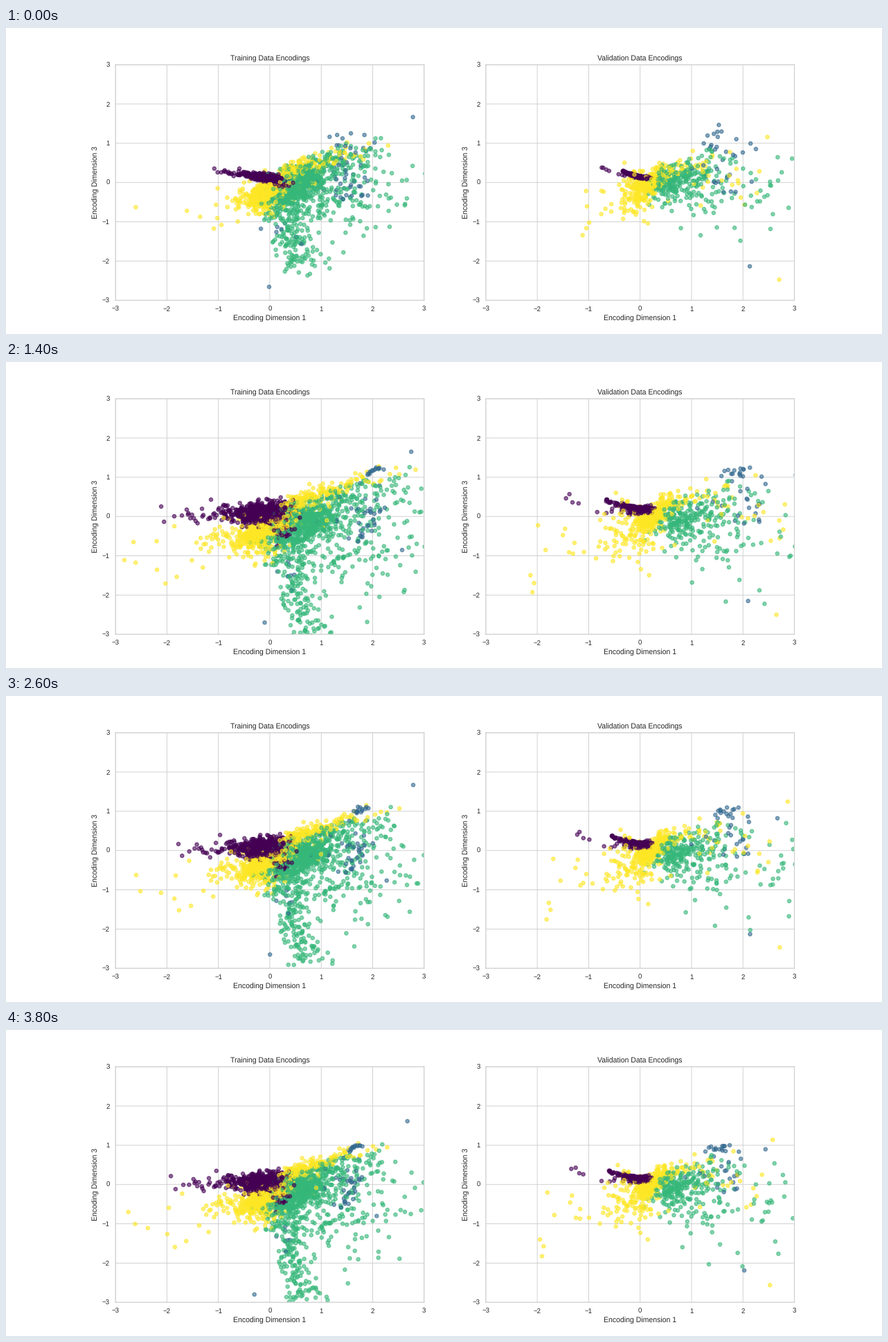
Animation, 1265 px wide and 443 px high, one loop 4000 ms. Source, as a matplotlib script:

```python
import numpy as np
import matplotlib.pyplot as plt
from matplotlib.animation import FuncAnimation

W, H, DPI = 1265, 443, 64
K = 63.25 / DPI  # point size correction
FRAMES = 20
PURPLE, BLUE, GREEN, YELLOW = range(4)
COLORS = np.array(["#440154", "#31688e", "#35b779", "#fde725"])

plt.rcParams.update({
    "font.family": "Liberation Sans", "text.hinting": "no_hinting",
    "text.color": ".15", "axes.labelcolor": ".15",
    "xtick.color": ".15", "ytick.color": ".15",
    "axes.edgecolor": ".8", "axes.linewidth": 1.25 * K,
    "axes.axisbelow": True, "axes.grid": True,
    "grid.color": ".8", "grid.linewidth": K, "path.snap": False,
    "axes.titlesize": 12 * K, "axes.labelsize": 12 * K,
    "axes.titlepad": 6 * K, "axes.labelpad": 4 * K,
    "xtick.labelsize": 11 * K, "ytick.labelsize": 11 * K,
    "xtick.bottom": False, "ytick.left": False,
    "xtick.major.size": 6 * K, "ytick.major.size": 6 * K,
    "xtick.major.pad": 3.5 * K, "ytick.major.pad": 3.5 * K,
})


def stretch(i, start, peak, rest, drift):
    """Grow fast to a peak, ease back around epoch 8, then drift."""
    value = start + (peak - start) * (1 - np.exp(-i / 1.2))
    u = np.clip((i - 6) / 3, 0, 1)
    return value + (rest - value) * u * u * (3 - 2 * u) + drift * max(i - 9, 0)


def blob(rng, n, cx, cy, sx, sy, slope=0):
    x = rng.normal(0, sx, n)
    return np.c_[cx + x, cy + slope * x + rng.normal(0, sy, n)]


def tail(rng, n, x0, y0, length, slope, width):
    """Points thinning out along a ray; negative length runs left."""
    x = x0 + np.sign(length) * rng.exponential(abs(length), n)
    return np.c_[x, y0 + slope * (x - x0) + rng.normal(0, width, n)]


def sparse(rng, n, x0, x1, y0, y1):
    return rng.uniform((x0, y0), (x1, y1), (n, 2))


def below_ray(p):
    """Fold points back under the upper edge of the fan."""
    top = .12 + .45 * np.maximum(p[:, 0], 0)
    p[:, 1] = np.where(p[:, 1] > top, 2 * top - p[:, 1], p[:, 1])
    return p


def training(rng):
    purple = [blob(rng, 430, 0, .08, .2, .13, .12),
              tail(rng, 210, -.15, .06, -.3, 0, .1),
              blob(rng, 45, .2, -.3, .13, .15)]

    t = rng.random((230, 1))
    core = (-.3, -.6) + .58 * t + rng.normal(0, .11, (230, 2))
    yellow = [core,
              tail(rng, 170, -.05, -.42, -.33, .08, .19),
              blob(rng, 50, -.15, -.75, .25, .2),
              tail(rng, 200, .3, .23, .5, .43, .11),
              blob(rng, 45, .5, .05, .3, .2),
              sparse(rng, 10, -2.4, -.9, -1.65, -.6)]

    y = -.5 - 2.4 * rng.random(230) ** 1.8
    column = np.c_[.15 - .27 * (y + .5) + rng.normal(0, .21, 230), y]
    wide = np.c_[.4 + np.abs(rng.normal(0, 1.1, 310)),
                 rng.normal(-.4, .78, 310)]
    green = [below_ray(blob(rng, 400, .6, -.13, .26, .23, .1)), column,
             below_ray(wide), below_ray(blob(rng, 100, 1.3, .3, .5, .25, .3))]

    blue = [blob(rng, 14, 1.8, 1.04, .08, .03, .5),
            blob(rng, 16, 1.7, 0, .12, .17),
            blob(rng, 8, 1.6, -.45, .06, .1, 1),
            blob(rng, 7, .3, -1.2, .25, .2),
            below_ray(blob(rng, 14, 1.4, .3, .5, .5))]
    return purple, blue, green, yellow


def validation(rng):
    purple = [tail(rng, 90, -.05, .17, -.17, -.4, .022),
              blob(rng, 130, .06, .15, .1, .04),
              blob(rng, 14, -.2, .1, .18, .07),
              sparse(rng, 4, -1.2, -.9, .1, .5)]
    purple[0][:, 0] = np.maximum(purple[0][:, 0], -.52)
    purple[0][:, 1] = np.minimum(purple[0][:, 1], .38)

    yellow = [blob(rng, 170, .2, -.04, .14, .15, .5),
              blob(rng, 120, -.15, -.35, .28, .33),
              tail(rng, 70, .3, .2, .38, .42, .13),
              blob(rng, 16, 1.5, .2, .45, .3),
              sparse(rng, 9, -1.75, -.9, -2, 0),
              sparse(rng, 5, 2, 2.9, -.7, 1.2)]

    green = [below_ray(blob(rng, 130, .62, -.08, .22, .22)),
             below_ray(blob(rng, 110, 1.1, -.25, .38, .42)),
             below_ray(blob(rng, 30, 1.4, .35, .35, .25)),
             below_ray(blob(rng, 28, 2.6, -.3, .4, .6)),
             sparse(rng, 4, 1, 2.8, -2.1, -1.3)]

    blue = [blob(rng, 14, 1.65, .97, .14, .07, .3),
            blob(rng, 6, 1.95, 0, .15, .13),
            blob(rng, 15, 1.8, .45, .45, .28)]
    return purple, blue, green, yellow


class Cloud:
    """wanderers: lone points as (class, x, y, swing)."""

    def __init__(self, ax, make, wanderers, seed):
        rng = np.random.default_rng(seed)
        groups = [np.vstack(g) for g in make(rng)]
        base = np.vstack(groups)
        label = np.repeat(np.arange(4), [len(g) for g in groups])
        order = rng.permutation(len(base))
        self.base, self.label = base[order], label[order]
        shape = base.shape
        self.drift = rng.normal(0, .018, shape)
        self.drift *= np.abs(self.base).max(axis=1, keepdims=True)
        self.phase = rng.uniform(0, 2 * np.pi, shape)
        loose = np.choose(self.label, [.1, 3, 1.2, 1])[:, None]
        self.scatter = rng.normal(0, .07, shape) * loose
        self.wanderers = wanderers
        labels = np.r_[self.label, [w[0] for w in wanderers]].astype(int)
        self.dots = ax.scatter(*self.at(0).T, c=COLORS[labels], alpha=.6,
                               s=36 * K * K, linewidths=1.5 * K)

    def at(self, i):
        left = stretch(i, .64, 1.33, 1, .013)
        right = stretch(i, .87, 1.15, 1.03, -.012)
        down = stretch(i, .78, 1.12, .96, .005)
        x, y = self.base.T
        px = x * np.where(x < 0, left, right)
        py = y * np.where(y < 0, down, right)

        # the first epochs start from a thinner, tilted layout
        early = np.exp(-1.1 * i)
        thin = .12 - .2 * px + .4 * (py - .08)
        tilt = np.select([self.label == PURPLE, self.label == GREEN],
                         [thin - py, .15 * np.clip(px, 0, 1)], 0)
        p = np.c_[px, py + early * tilt] + early * self.scatter
        p += self.drift * np.sin(.45 * i + self.phase)

        swing = np.sin(.48 * (i - 7))
        lone = [(wx + r * swing, wy + r * swing / 2)
                for _, wx, wy, r in self.wanderers]
        return np.vstack([p, lone])

    def show(self, i):
        self.dots.set_offsets(self.at(i))
        return self.dots


fig, axes = plt.subplots(1, 2, figsize=(W / DPI, H / DPI), dpi=DPI)
fig.subplots_adjust(left=.125, right=.9, bottom=.11, top=.88, wspace=.2)
for ax, name in zip(axes, ("Training", "Validation")):
    ax.set(title=f"{name} Data Encodings", xlim=(-3, 3), ylim=(-3, 3),
           xticks=range(-3, 4), yticks=range(-3, 4),
           xlabel="Encoding Dimension 1", ylabel="Encoding Dimension 3")

clouds = [
    Cloud(axes[0], training,
          [(BLUE, 2.75, 1.65, .15), (BLUE, -.1, -2.7, .4),
           (YELLOW, -2.65, -.65, .2)], 4),
    Cloud(axes[1], validation,
          [(YELLOW, 2.65, -2.5, .25), (BLUE, 2.1, -2.15, .15)], 9),
]


def update(i):
    return [c.show(i) for c in clouds]


anim = FuncAnimation(fig, update, frames=FRAMES, interval=200,
                     repeat=True, repeat_delay=0, blit=False)
plt.show()
```
